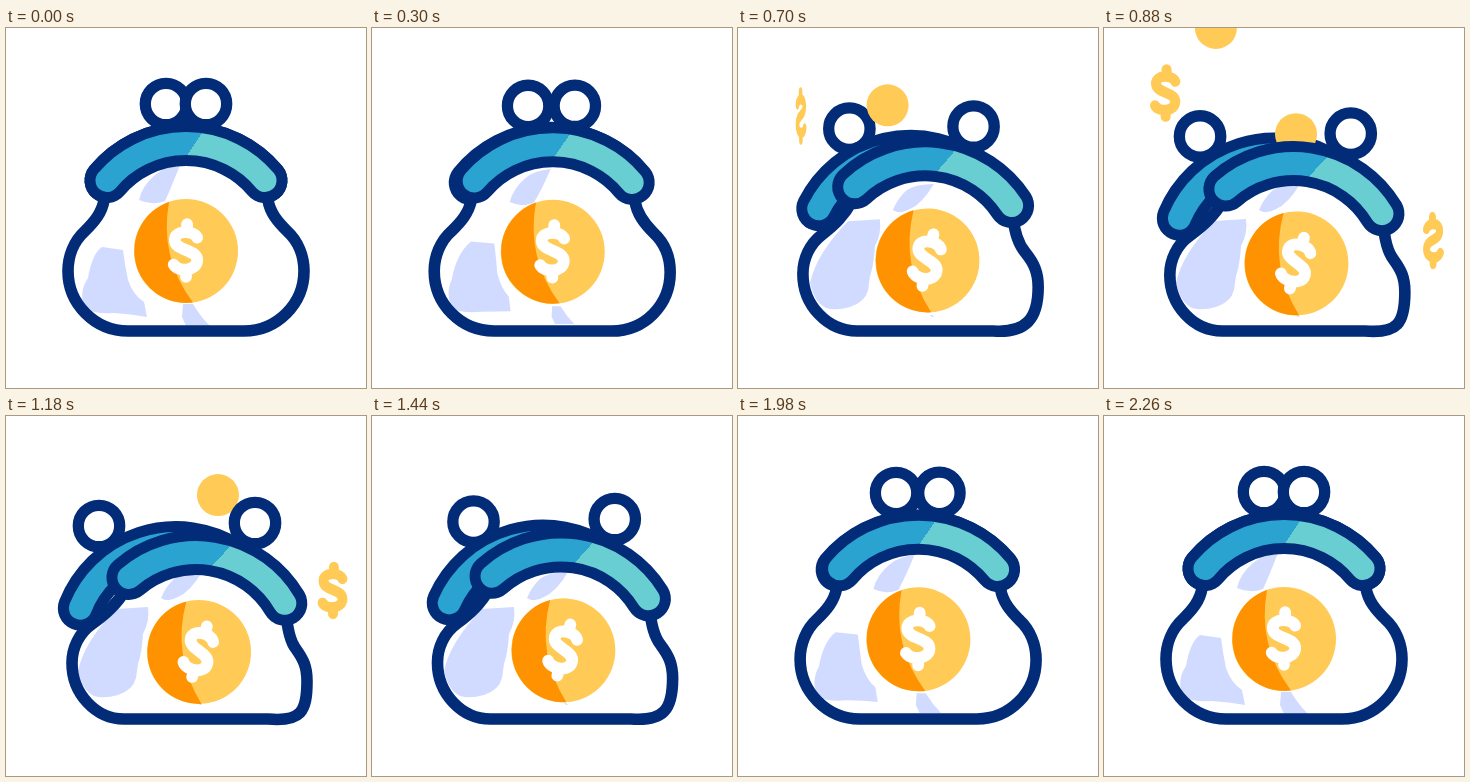
Write an HTML page that moves like this. It is 360 px wide and 360 px high and loops after 2.4 s.

```html
<!DOCTYPE html>
<html lang="en">
<head>
<meta charset="utf-8">
<title>Coin purse</title>
<style>
  html, body { margin: 0; width: 100%; height: 100%; overflow: hidden; background: #fff; }
  svg { display: block; width: 100vw; height: 100vh; }
  .line { fill: none; stroke: #022b78; stroke-width: 11.6; stroke-linecap: round; stroke-linejoin: round; }
  .ball { fill: #fff; stroke: #022b78; stroke-width: 11.3; }
  .rim { fill: none; stroke: #022b78; stroke-width: 45; stroke-linecap: round; }
  .band { fill: none; stroke-width: 23; stroke-linecap: round; }
  .white { fill: #fff; }
  .shade { fill: #d1dbff; }
  .gold { fill: #ffca55; }
  .sign { fill: none; stroke-width: 10.5; stroke-linecap: round; stroke-linejoin: round; }
</style>
</head>
<body>
<svg viewBox="0 0 360 360">
  <defs>
    <linearGradient id="teal" gradientUnits="userSpaceOnUse" x1="162" y1="95" x2="218" y2="133">
      <stop offset=".5" stop-color="#2ba3d1"/>
      <stop offset=".5" stop-color="#69ced1"/>
    </linearGradient>
    <path id="arc" d="M101 152.5A103 103 0 0 1 259 152.5"/>
    <path id="dollar" d="M10-11C7-18-10-18-10-9C-10 1 10-1 10 9C10 19-7 20-11 13M1-23V-17M0 18V24"/>
    <g id="clasp">
      <use href="#arc" class="rim"/>
      <use href="#arc" class="band"/>
    </g>
  </defs>

  <circle id="ballL" class="ball" r="20.7"/>
  <use id="back" href="#clasp" stroke="#2ba3d1"/>
  <g id="coins" class="gold">
    <circle r="21"/><circle r="21"/><circle r="21"/>
  </g>
  <circle id="ballR" class="ball" r="20.7"/>
  <path id="flap" class="white" d="M101 153A103 103 0 0 1 259 153L248 180H112Z"/>
  <path id="body" class="white"/>
  <path id="shade" class="shade"/>
  <g id="coin">
    <circle class="gold" r="52"/>
    <path fill="#ff9200" d="M-17-49.1Q-27 6 7 51.5A52 52 0 0 1-17-49.1Z"/>
    <use id="mark" href="#dollar" class="sign" stroke="#fff"/>
  </g>
  <path id="outline" class="line"/>
  <use id="front" href="#clasp" stroke="url(#teal)"/>
  <g id="signs" class="sign" stroke="#ffca55">
    <use href="#dollar"/><use href="#dollar"/>
  </g>
</svg>
<script>
const LOOP = 2400;
const $ = id => document.getElementById(id);
const set = (id, name, value) => $(id).setAttribute(name, value);
const clamp = x => Math.min(1, Math.max(0, x));
const smoother = x => (x = clamp(x), x * x * x * (x * (6 * x - 15) + 10));

// Blend two paths that share the same commands
const NUM = /-?[\d.]+/g;
function blend([a, b], k) {
  const to = b.match(NUM);
  let i = 0;
  return a.replace(NUM, n => (+n + (to[i++] - n) * k).toFixed(2));
}

const BODY = [
  'M98 172 C96 185 88 194 79 203 C68 213 62 228 62 243 C62 276 89 303 122 303 L238 303 C271 303 298 276 298 243 C298 228 292 213 281 203 C272 194 264 185 262 172',
  'M121 172 C110 189 100 198 86 208 C73 217 66 232 66 247 C66 278 90 303 118 303 L262 303 C295 306 301 296 301 265 C301 250 297 243 290 233 C283 224 281 210 280 195'
];
const SHADE = [
  'M96 219 L117 222 Q119 238 122 252 Q127 267 138 274 L141 289 Q125 286 108 285 Q88 286 79 281 Q72 265 82 250 Q86 226 96 219Z ' +
  'M174 137 Q158 139 149 147 Q136 158 133 172 Q146 178 159 173 Q165 160 174 137Z ' +
  'M177 276 L187 276 Q194 288 204 298 L180 298 L176 289Z',
  'M110 193 L142 191 Q144 205 137 218 Q136 236 132 248 Q130 262 127 274 L112 279 Q98 283 88 280 Q76 274 72 255 Q78 226 110 193Z ' +
  'M196 156 Q178 156 169 162 Q160 170 155 182 Q162 187 172 181 Q184 176 196 156Z ' +
  'M192 287 L194 287 Q195 288 196 289 L194 289 L193 288Z'
];

// Rising coins: time at the purse mouth, sideways drift per pixel climbed
const COINS = [[531, -.487], [778, .16], [1015, .38]];
// Side signs: start time, position
const SIGNS = [[400, 65, 125.5], [750, 330, 228.5]];

function drawPurse(p) {
  const front = `translate(${10 * p} ${21 * p}) rotate(${9.4 * p} 180 219)`;
  set('front', 'transform', front);
  set('flap', 'transform', front);
  set('back', 'transform', `translate(${-10 * p} ${12 * p}) rotate(${-18 * p} 180 219)`);
  set('ballL', 'transform', `translate(${160 - 67 * p} ${76 + 34 * p})`);
  set('ballR', 'transform', `translate(${200 + 49 * p} ${76 + 31 * p})`);
  const body = blend(BODY, p);
  set('body', 'd', body);
  set('outline', 'd', body);
  set('shade', 'd', blend(SHADE, 1 - (1 - p) ** 4));
  set('coin', 'transform', `translate(${180 + 13 * p} ${223 + 13 * p}) rotate(${5 * p})`);
  set('mark', 'transform', `translate(0 -1) rotate(${10 * p}) scale(1.12)`);
}

function drawCoins(t) {
  COINS.forEach(([start, drift], i) => {
    const rise = (t - start) * .43;
    const c = $('coins').children[i];
    c.setAttribute('visibility', rise > 0 && rise < 175 ? 'visible' : 'hidden');
    c.setAttribute('transform', `translate(${185 + drift * rise} ${150 - rise})`);
  });
}

function drawSigns(t) {
  SIGNS.forEach(([start, x, y], i) => {
    const u = t - start;
    const size = clamp(Math.min(u, 640 - u) / 80);
    const turn = Math.cos((40 + .7 * u) * Math.PI / 180);
    const s = $('signs').children[i];
    s.setAttribute('visibility', size > 0 ? 'visible' : 'hidden');
    s.setAttribute('transform', `translate(${x - .007 * u} ${y - .127 * u}) scale(${size * turn} ${size})`);
  });
}

function frame(now) {
  const t = now % LOOP;
  drawPurse(smoother((t - 112) / 940) - smoother((t - 1185) / 940));
  drawCoins(t);
  drawSigns(t);
}

let begin;
function tick(now) {
  begin ??= now;
  frame(now - begin);
  requestAnimationFrame(tick);
}
frame(0);
requestAnimationFrame(tick);
</script>
</body>
</html>
```
